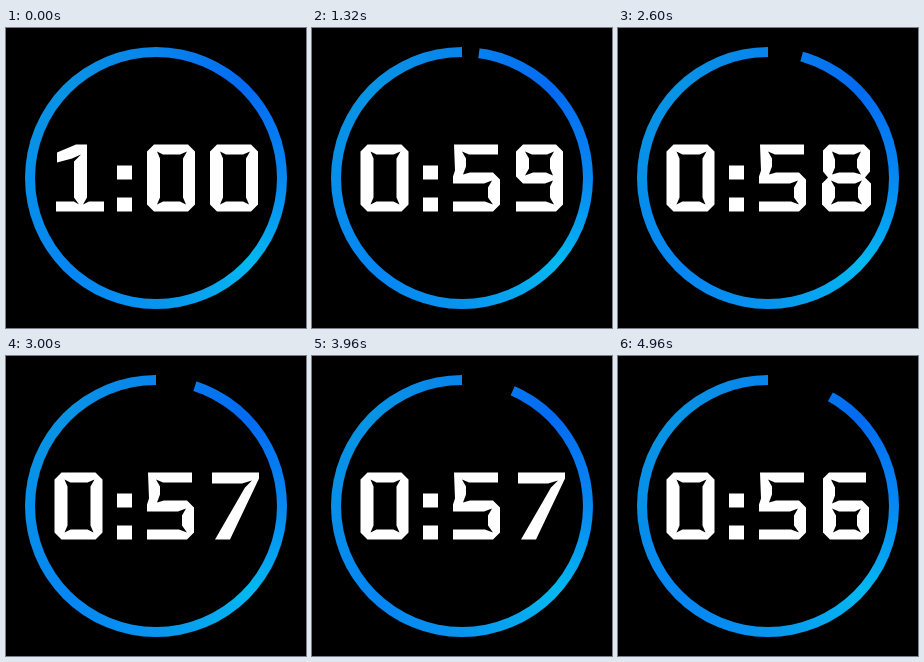
Write an HTML page without scripts that moves like this. It is 300x300 px and loops after 5000 ms.

```html
<!DOCTYPE html>
<html lang="en">
<head>
<meta charset="utf-8">
<title>Countdown</title>
<style>
  html, body { margin: 0; width: 100%; height: 100%; overflow: hidden; background: #000; }

  .stage { position: relative; width: 300px; height: 300px; }

  .ring, .ring::after { position: absolute; border-radius: 50%; content: ""; }
  .ring {
    inset: 19px;
    background: conic-gradient(#0884ec, #046af2 45deg, #0688f2 90deg, #04b8f0 132deg,
      #0894ee 180deg, #0686f4 222deg, #0690e8 275deg, #0894e4 315deg, #0884ec);
  }
  .ring::after { inset: 10px; background: #000; }

  svg { position: absolute; inset: 0; }

  .gap {
    fill: none;
    stroke: #000;
    stroke-width: 14;
    animation: drain 5s steps(24) -1ms infinite;
  }
  .face {
    fill: #fff;
    fill-rule: evenodd;
    animation: show 5s step-end calc(var(--second) * 1s - 5.001s) infinite;
  }

  /* Each second opens with a doubled step, then 24 even ones. */
  @keyframes drain {
    0%, .8% { stroke-dasharray: 0 360; }
    20%, 20.8% { stroke-dasharray: 6 360; }
    40%, 40.8% { stroke-dasharray: 12 360; }
    60%, 60.8% { stroke-dasharray: 18 360; }
    80%, 80.8% { stroke-dasharray: 24 360; }
    100% { stroke-dasharray: 30 360; }
  }
  @keyframes show {
    0% { visibility: visible; }
    20%, 100% { visibility: hidden; }
  }
</style>
</head>
<body>
<div class="stage">
  <div class="ring"></div>
  <svg width="300" height="300" viewBox="0 0 300 300" role="img" aria-label="Countdown from 1:00">
    <defs>
      <path id="d0" d="M7 0H41L48 7V60L41 67H7L0 60V7zM10 7L16 10H33L40 7 36 14V53L39 60 33 57H16L10 60 13 53V14z"/>
      <path id="d1" d="M1 8L20 0H31V53L27 60 33 57H48V67H0V57H18L23 60 18 53V17L25 10 16 14 1 18z"/>
      <path id="d5" d="M1 0H45V10H16L9 7 13 14V22L10 30 17 28H40L47 35V60L40 67H0V57H32L40 60 35 53V43L39 36 31 39H0V32L2 26z"/>
      <path id="d6" d="M7 0H44V10H17L9 7 13 15V23L10 31 17 28H40L47 35V60L40 67H8L1 60V6zM10 36L17 39H33L39 36 35 43V53L39 60 33 57H17L11 60 14 53V43z"/>
      <path id="d7" d="M2 0H49V6L20 67H5L35 15 42 8 32 11H2z"/>
      <path id="d8" d="M7 0H42L48 6V27L43 33 49 39V60L42 67H7L0 60V39L6 33 1 27V6zM10 7L17 10H32L39 7 35 15V23L39 30 32 28H17L10 30 13 23V15zM9 36L16 39H33L40 36 36 43V53L40 60 33 57H16L9 60 13 53V43z"/>
      <path id="d9" d="M7 0H40L47 7V60L40 67H0V57H30L38 60 34 53V42L37 36 29 39H7L0 32V7zM9 7L16 10H31L38 7 34 14V24L37 31 30 28H17L9 31 13 24V14z"/>
      <g id="minute0"><use href="#d0" x="48.5"/><use href="#d5" x="141"/></g>
    </defs>

    <circle class="gap" cx="150" cy="150" r="126" pathLength="360" transform="rotate(-90 150 150)"/>

    <g transform="translate(0 116.5)">
      <path fill="#fff" d="M111 21h15v14h-15zM111 53h15v14h-15z"/>
      <g class="face" style="--second:0"><use href="#d1" x="50"/><use href="#d0" x="141"/><use href="#d0" x="204"/></g>
      <g class="face" style="--second:1"><use href="#minute0"/><use href="#d9" x="204"/></g>
      <g class="face" style="--second:2"><use href="#minute0"/><use href="#d8" x="204"/></g>
      <g class="face" style="--second:3"><use href="#minute0"/><use href="#d7" x="204"/></g>
      <g class="face" style="--second:4"><use href="#minute0"/><use href="#d6" x="204"/></g>
    </g>
  </svg>
</div>
</body>
</html>
```
